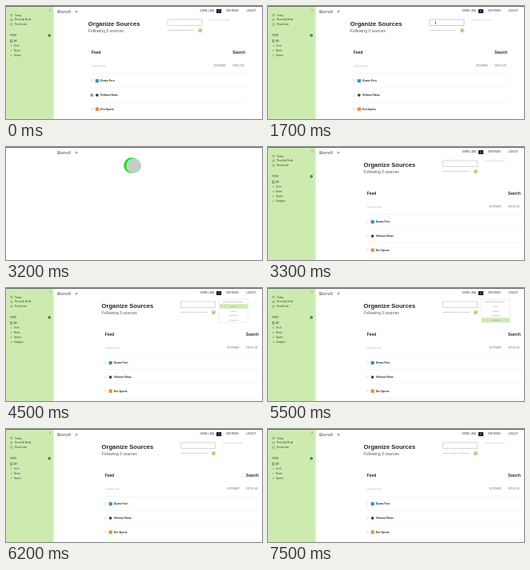
Write an HTML page with a canvas that moves like this. It is 320x142 px and loops after 8000 ms.

```html
<!DOCTYPE html>
<html lang="en">
<head>
<meta charset="utf-8">
<title>Organize sources</title>
<style>
html, body { margin: 0; width: 100%; height: 100%; overflow: hidden; background: #fff; }
canvas { display: block; width: 320px; height: 142px; }
</style>
</head>
<body>
<canvas id="stage"></canvas>
<script>
const W = 320, H = 142, LOOP = 8000;
const canvas = document.getElementById('stage');
const ctx = canvas.getContext('2d');
const dpr = window.devicePixelRatio || 1;
canvas.width = W * dpr;
canvas.height = H * dpr;

const FONT = '"Liberation Sans", Arial, sans-serif';
const INK = '#222', SOFT = '#777', PALE = '#999', LEAF = '#cdebb1';
const WORD = 'Gadgets';
const FEEDS = [
  { name: 'Gizmo Fern', y: 94, color: '#3c8fc4', round: false },
  { name: 'Velmoor News', y: 112, color: '#333', round: true },
  { name: 'Orn Sports', y: 129.5, color: '#ee8a32', round: false }
];
const between = (t, a, b) => t >= a && t < b;

// Text is vertically centred on y and drawn in large units for smooth tiny sizes.
function text(s, x, y, size, color = SOFT, weight = 400, align = 'left') {
  ctx.save();
  ctx.translate(x, y + size * 0.35);
  ctx.scale(0.1, 0.1);
  ctx.font = `${weight} ${size * 10}px ${FONT}`;
  ctx.textAlign = align;
  ctx.fillStyle = color;
  ctx.fillText(s, 0, 0);
  ctx.restore();
}

function rect(x, y, w, h, color) {
  ctx.fillStyle = color;
  ctx.fillRect(x, y, w, h);
}

function box(x, y, w, h, color, width = 0.5) {
  ctx.strokeStyle = color;
  ctx.lineWidth = width;
  ctx.strokeRect(x, y, w, h);
}

function disc(x, y, r, color) {
  ctx.fillStyle = color;
  ctx.beginPath();
  ctx.arc(x, y, r, 0, Math.PI * 2);
  ctx.fill();
}

function path(points, color, width = 0.5) {
  ctx.strokeStyle = color;
  ctx.lineWidth = width;
  ctx.beginPath();
  points.forEach(([x, y]) => ctx.lineTo(x, y));
  ctx.stroke();
}

function brand() {
  text('Borvil', 64, 6.5, 6, '#777', 700);
  disc(88, 7, 1.5, '#aaa');
}

function sidebar(t) {
  const dark = '#34482a';
  rect(0, 1, 59.5, 141, LEAF);
  path([[55.6, 3.8], [54.6, 5], [55.6, 6.2]], dark);
  ['Today', 'Recently Read', 'Read Later'].forEach((label, i) => {
    const y = 11.5 + i * 5.8;
    box(5.8, y - 1.1, 2.2, 2.2, '#5f8350');
    text(label, 11, y, 3.1, dark);
  });
  text('FEED', 5, 37, 3.1, dark);
  disc(54.2, 37, 1.7, '#42543a');
  disc(54.2, 37, 0.6, LEAF);
  const groups = ['All', 'Tech', 'News', 'Sports'];
  if (between(t, 3300, 5800)) groups.push(WORD);
  groups.forEach((label, i) => {
    const y = 44 + i * 6;
    if (i) path([[6.2, y - 1], [7.2, y], [6.2, y + 1]], dark);
    else box(5.6, y - 1.2, 2.4, 2.4, dark);
    text(label, 10, y, 3.1, dark);
  });
}

function header() {
  brand();
  text('VORNE, LIDIA', 242.5, 6.5, 2.6, INK);
  rect(263, 4, 6.2, 5, '#171b38');
  disc(266, 6.5, 1, '#59668f');
  text('OUR FEEDS', 275, 6.5, 2.7, INK);
  text('LOGOUT', 300.5, 6.5, 2.8, INK);
}

function creator(t) {
  const typed = t < 2000 || t >= 3200 ? 0
    : Math.min(7, 1 + Math.floor(Math.floor((t - 2000) / 100) * 1.5));
  const focused = between(t, 500, 3200);
  rect(202, 17, 43, 7.5, '#fff');
  box(202, 17, 43, 7.5, focused ? '#999' : '#b0b0b0');
  text(WORD.slice(0, typed), 209, 21, 2.9, INK);
  if (between(t, 500, 1200) || between(t, 1700, 2000)) rect(209.2, 19, 0.6, 4, INK);

  const hover = between(t, 2900, 3200);
  text('CREATE NEW COLLECTION', 202, 30.5, 2.5, SOFT);
  rect(240.2, 28.2, 5, 5, hover ? '#6dae98' : '#c9e3a0');
  path([[241.4, 30.7], [242.4, 31.8], [244, 29.6]], hover ? '#fff' : '#667d46', 0.7);
}

function remover(t) {
  if (between(t, 4500, 5800)) {
    rect(250, 14, 35.5, 29.5, '#fff');
    box(250, 14, 35.5, 29.5, '#ddd');
    const active = t < 4600 ? 0 : t < 4700 ? 1 : t < 4900 ? 2 : 3;
    ['TECH', 'NEWS', 'SPORTS', WORD.toUpperCase()].forEach((label, i) => {
      const y = 23 + i * 5.7;
      if (i === active) rect(250.3, y - 2.8, 34.9, 5.6, LEAF);
      text(label, 267.7, y, 2.5, SOFT, 400, 'center');
    });
  }
  text('DELETE COLLECTION', 254, 17, 2.4, between(t, 4000, 5800) ? '#666' : PALE);
}

function feedTable(t) {
  text('Feed', 107, 58.3, 4.9, INK, 700);
  text('Search', 299, 58.3, 4.7, INK, 700, 'right');
  text('SOURCE NAME', 107, 75.5, 2.4, SOFT);
  text('BOOKMARK', 260, 75.5, 2.6, SOFT);
  text('UNFOLLOW', 283, 75.5, 2.6, SOFT);
  [84, 102.5, 120.5, 139].forEach(y => rect(107, y, 194, 0.5, '#eee'));
  FEEDS.forEach((feed, i) => {
    const y = feed.y;
    if (i === 1 && t < 100) {
      rect(105.6, y - 1.6, 3.2, 3.2, '#3d86cf');
      path([[106.3, y], [107, y + 0.8], [108.2, y - 0.8]], '#fff');
    } else {
      box(106.5, y - 1.2, 2.4, 2.4, '#ccc', 0.4);
    }
    if (feed.round) disc(113.8, y, 1.8, feed.color);
    else rect(111.8, y - 2, 4.2, 4.2, feed.color);
    text(feed.name, 118, y, 3.2, INK, 700);
  });
}

function page(t) {
  sidebar(t);
  header();
  ctx.save();
  // The content moves right after the first reload.
  if (t >= 3300) ctx.translate(16.8, 0);
  text('Organize Sources', 102.8, 22, 7.6, INK, 700);
  text('Following 3 sources', 102.8, 31, 5, '#555');
  creator(t);
  feedTable(t);
  remover(t);
  ctx.restore();
}

function loader(age) {
  brand();
  const angle = Math.PI * 1.06 + age / 1000 * Math.PI * 2;
  disc(159.5 + Math.cos(angle) * 2.6, 23.6 + Math.sin(angle) * 2.6, 9.8, '#17e62b');
  disc(159.7, 23.7, 9.4, '#c5cdca');
}

function draw(t) {
  ctx.setTransform(dpr, 0, 0, dpr, 0, 0);
  rect(0, 0, W, H, '#fff');
  if (between(t, 3200, 3300)) loader(t - 3200);
  else if (between(t, 5800, 6000)) loader(t - 5800);
  else page(t);
  rect(0, 0, W, 1, '#666');
}

const start = performance.now();
function tick() {
  draw((performance.now() - start) % LOOP);
  requestAnimationFrame(tick);
}
tick();
</script>
</body>
</html>
```
